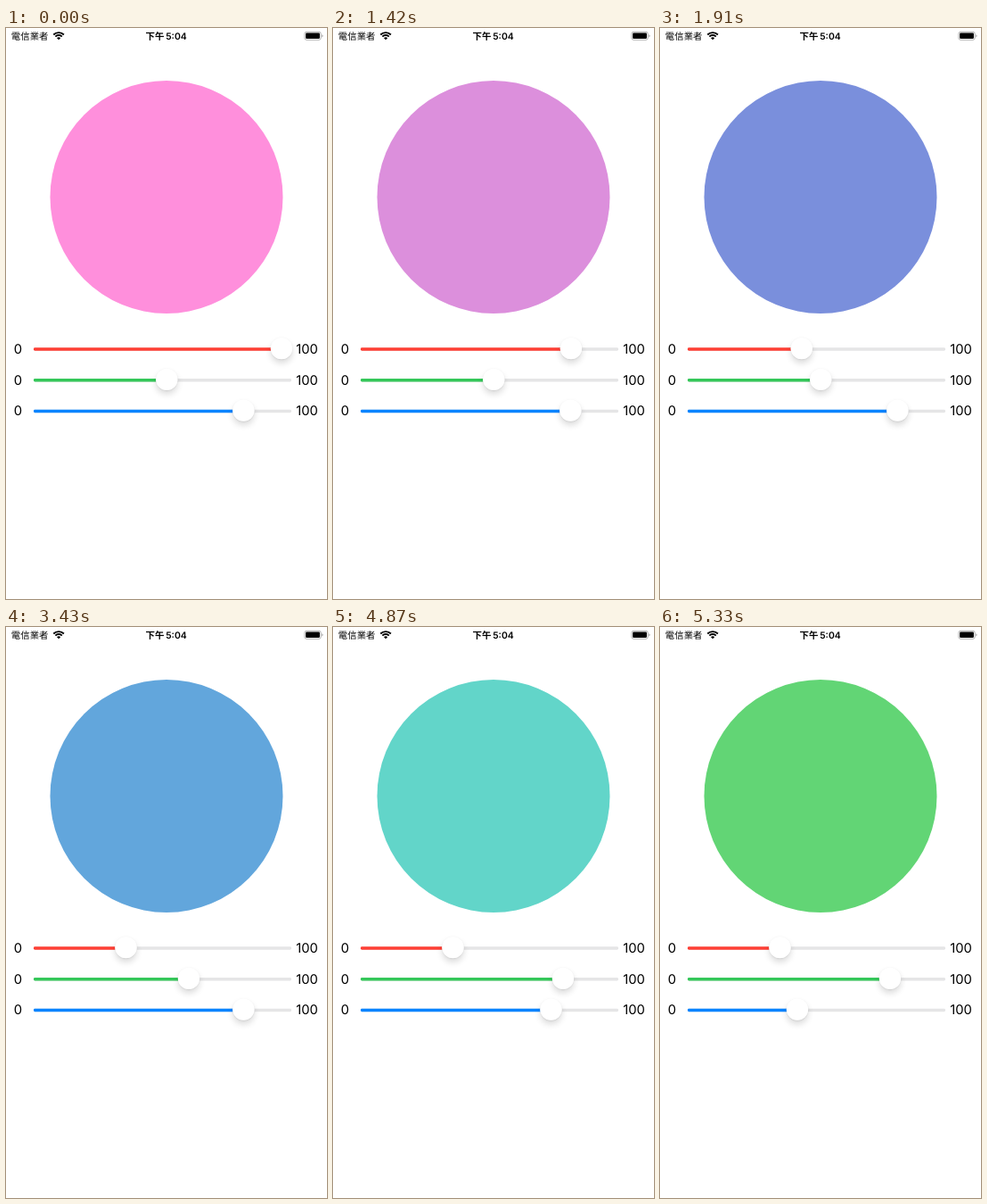
An HTML page with a canvas for the animation above (5370 ms loop, 360 by 640 pixels).

```html
<!DOCTYPE html>
<html lang="zh-Hant">
<head>
<meta charset="utf-8">
<title>RGB sliders</title>
<style>
  html, body { margin: 0; width: 100%; height: 100%; overflow: hidden; background: #fff; }
  canvas, svg { position: absolute; left: 0; top: 0; width: 360px; height: 640px; display: block; }
  text { font-family: Inter, "Noto Sans CJK TC", "Noto Sans CJK", sans-serif; text-rendering: geometricPrecision; }
  .label { font-size: 14.8px; text-anchor: middle; }
  .status { font-size: 10.45px; }
  .time { font-weight: 600; }
</style>
</head>
<body>
<canvas id="stage"></canvas>
<svg viewBox="0 0 360 640">
  <g class="status">
    <text x="5.8" y="12.9">電信業者</text>
    <text class="time" x="156.5" y="12.9">下午</text>
    <text class="time" x="179.2" y="12.9">5:04</text>
  </g>
  <g fill="none" stroke="#000" stroke-width="1.9">
    <path d="M53.3 7.5A8.2 8.2 0 0 1 64.9 7.5"/>
    <path d="M55.4 9.6A5.2 5.2 0 0 1 62.8 9.6"/>
  </g>
  <path d="M59.1 13.3L57 11.2A3 3 0 0 1 61.2 11.2Z"/>
  <rect x="334.9" y="4.3" width="18.3" height="9" rx="2.2" fill="none" stroke="#a6a6a6" stroke-width=".87"/>
  <rect x="336.1" y="5.6" width="15.8" height="6.4" rx="1.2"/>
  <path d="M354.3 7.2Q355.6 7.7 355.6 8.8T354.3 10.4Z" fill="#a6a6a6"/>
  <g class="label" id="labels"></g>
</svg>
<script>
const W = 360, H = 640, LOOP = 5370;
const ROW = { top: 359.94, gap: 34.78 };
const TRACK = { left: 31, right: 320, height: 3.48, corner: 1.4 };
const THUMB = { min: 42, max: 309, radius: 12.15 };

// A drag moves the thumb between two x positions in a number of visible steps.
const sliders = [
  { color: '#ff3f35', rest: 309, drags: [
    { start: 1301, end: 2253, steps: 8, from: 307.5, to: 134.5, power: 2 }] },
  { color: '#34c759', rest: 180.3, drags: [
    { start: 3425, end: 3800, steps: 3, from: 205, to: 254.5, power: 2 },
    { start: 4862, end: 4979, steps: 1, from: 258, to: 258, power: 1 }] },
  { color: '#0a84ff', rest: 266.4, drags: [
    { start: 4862, end: 5330, steps: 4, from: 244.5, to: 154, power: 1 }] }
];

const canvas = document.getElementById('stage');
const labels = document.getElementById('labels');
const ctx = canvas.getContext('2d');
const scale = window.devicePixelRatio || 1;
canvas.width = W * scale;
canvas.height = H * scale;
ctx.scale(scale, scale);

const rowY = i => ROW.top + i * ROW.gap;

sliders.forEach((_, i) => {
  const y = rowY(i) + 4.9;
  labels.insertAdjacentHTML('beforeend',
    `<text x="13.3" y="${y}">0</text><text x="337.6" y="${y}">100</text>`);
});

function dragAt({ start, end, steps, from, to, power }, time) {
  const step = Math.min(steps, Math.floor((time - start) / (end - start) * steps));
  return to + (from - to) * (1 - step / steps) ** power;
}

function positionAt({ rest, drags }, time) {
  const drag = drags.filter(d => time >= d.start).pop();
  return drag ? dragAt(drag, time) : rest;
}

// Slider value to display channel, with the slight lift of the colour profile.
function channel(x) {
  const v = (x - THUMB.min) / (THUMB.max - THUMB.min);
  return Math.round(255 * v + 42 * v * (1 - v));
}

function disc(x, y, radius, color) {
  ctx.fillStyle = color;
  ctx.beginPath();
  ctx.arc(x, y, radius, 0, Math.PI * 2);
  ctx.fill();
}

function bar(from, to, y, color) {
  ctx.fillStyle = color;
  ctx.beginPath();
  ctx.roundRect(from, y - TRACK.height / 2, to - from, TRACK.height, TRACK.corner);
  ctx.fill();
}

function setShadow(alpha, offset, blur) {
  ctx.shadowColor = `rgba(0,0,0,${alpha})`;
  ctx.shadowOffsetY = offset * scale;
  ctx.shadowBlur = blur * scale;
}

function drawSlider(x, y, color) {
  bar(TRACK.left, TRACK.right, y, '#e5e5e6');
  bar(TRACK.left, x, y, color);
  ctx.save();
  setShadow(0.14, 4.5, 7.5);
  disc(x, y - 0.8, THUMB.radius, '#fff');
  setShadow(0.1, 0.6, 1.5);
  disc(x, y - 0.8, THUMB.radius, '#fff');
  ctx.restore();
}

function draw(time) {
  const xs = sliders.map(s => positionAt(s, time));
  ctx.fillStyle = '#fff';
  ctx.fillRect(0, 0, W, H);
  disc(180, 189.5, 130.5, `rgb(${xs.map(channel).join(',')})`);
  sliders.forEach((s, i) => drawSlider(xs[i], rowY(i), s.color));
}

const begin = performance.now();
function tick() {
  draw((performance.now() - begin) % LOOP);
  requestAnimationFrame(tick);
}
tick();
</script>
</body>
</html>
```
